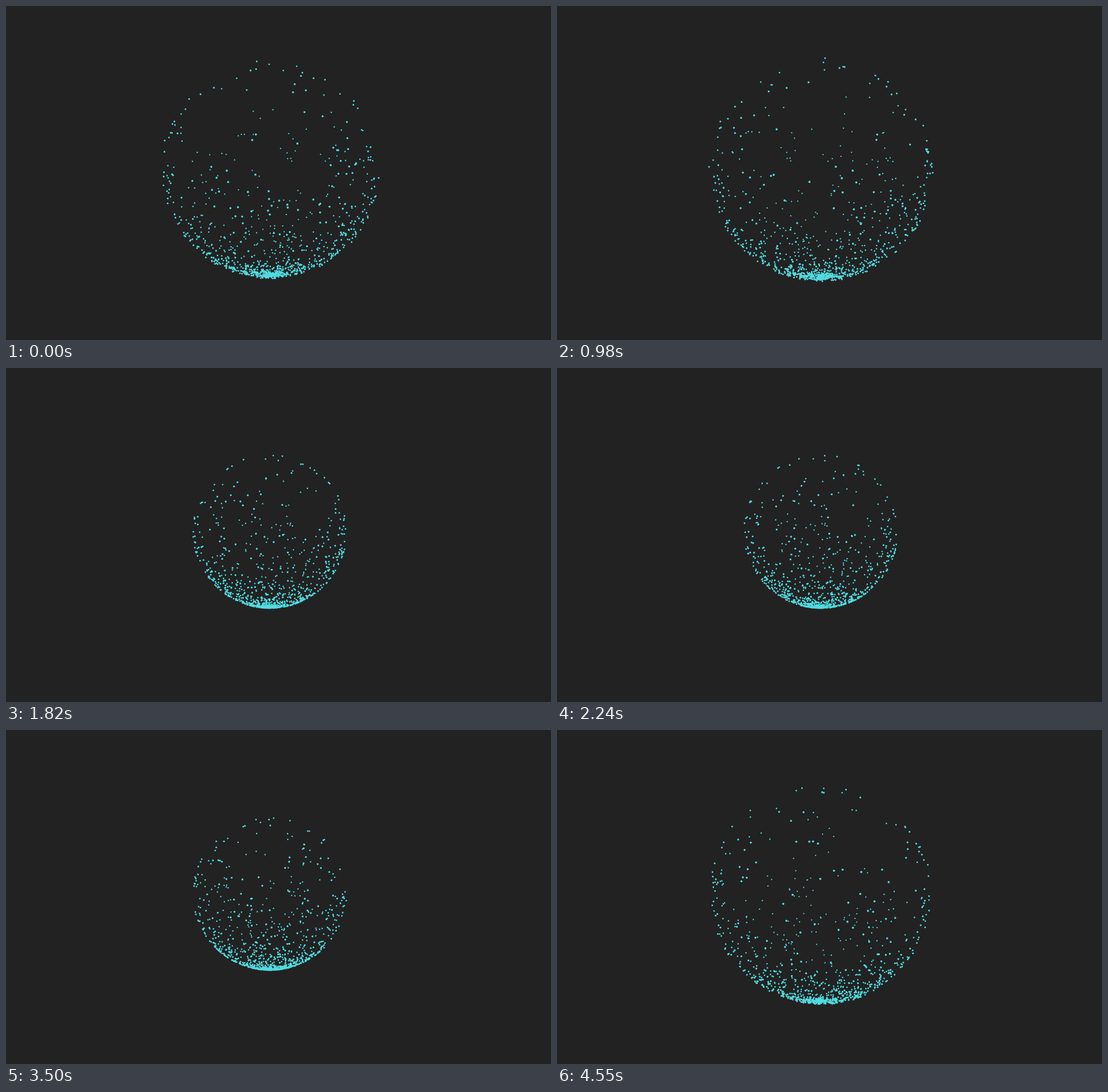
Animation of 944x580 px, one loop 4620 ms. Source, as an HTML page with a canvas:

```html
<!DOCTYPE html>
<html lang="en">
<head>
<meta charset="utf-8">
<title>Pulsing particle sphere</title>
<style>
html, body { margin: 0; width: 100%; height: 100%; overflow: hidden; background: #222; }
canvas { display: block; }
</style>
</head>
<body>
<canvas id="stage" width="944" height="580"></canvas>
<script>
const ctx = document.getElementById('stage').getContext('2d');
const LOOP = 4620, STEP = 70;
const CX = 457, CY = 284;
const CAMERA = 900, REST = 133, SPIN = 0.0006, SPREAD = 80;

// Half-sine swells: start, duration, height
const pulses = [
  [-370, 1085, 61],
  [642, 1025, 67],
  [2500, 880, 72],
  [4106, 1260, 64]
];

function seeded(seed) {
  return () => {
    seed = (seed + 0x6D2B79F5) | 0;
    let n = Math.imul(seed ^ (seed >>> 15), 1 | seed);
    n = (n + Math.imul(n ^ (n >>> 7), 61 | n)) ^ n;
    return ((n ^ (n >>> 14)) >>> 0) / 4294967296;
  };
}

const rand = seeded(71);

// Points on a unit sphere, crowded low and sparse high; each lags a little
function makeDot() {
  const u = rand();
  const height = u * u / (u * u + 6 * (1 - u));
  const y = 1 - 2 * height;
  return {
    y,
    ring: Math.sqrt(1 - y * y),
    angle: rand() * Math.PI * 2,
    lag: (rand() - 0.5) * SPREAD
  };
}
const dots = Array.from({ length: 980 }, makeDot);

// Sphere radius whose perspective silhouette equals the pulsing outline
function radiusAt(t) {
  let swell = 0;
  for (const [start, length, height] of pulses) {
    const p = (t - start) / length;
    if (p > 0 && p < 1) swell = Math.max(swell, height * Math.sin(Math.PI * p));
  }
  const edge = REST + swell;
  return edge * CAMERA / Math.hypot(CAMERA, edge);
}

function draw(t) {
  ctx.fillStyle = '#222';
  ctx.fillRect(0, 0, 944, 580);
  ctx.fillStyle = '#50dbe0';
  ctx.beginPath();
  for (const d of dots) {
    const radius = radiusAt(t - d.lag);
    const a = d.angle + t * SPIN;
    const scale = CAMERA / (CAMERA - radius * d.ring * Math.cos(a));
    const x = CX + radius * d.ring * Math.sin(a) * scale;
    const y = CY + radius * d.y * scale;
    const size = 1.4 * Math.pow(scale, 1.3);
    ctx.moveTo(x + size, y);
    ctx.arc(x, y, size, 0, Math.PI * 2);
  }
  ctx.fill();
}

const begin = performance.now();
function tick() {
  const t = (performance.now() - begin) % LOOP;
  draw(Math.floor(t / STEP) * STEP);
  requestAnimationFrame(tick);
}
tick();
</script>
</body>
</html>
```
